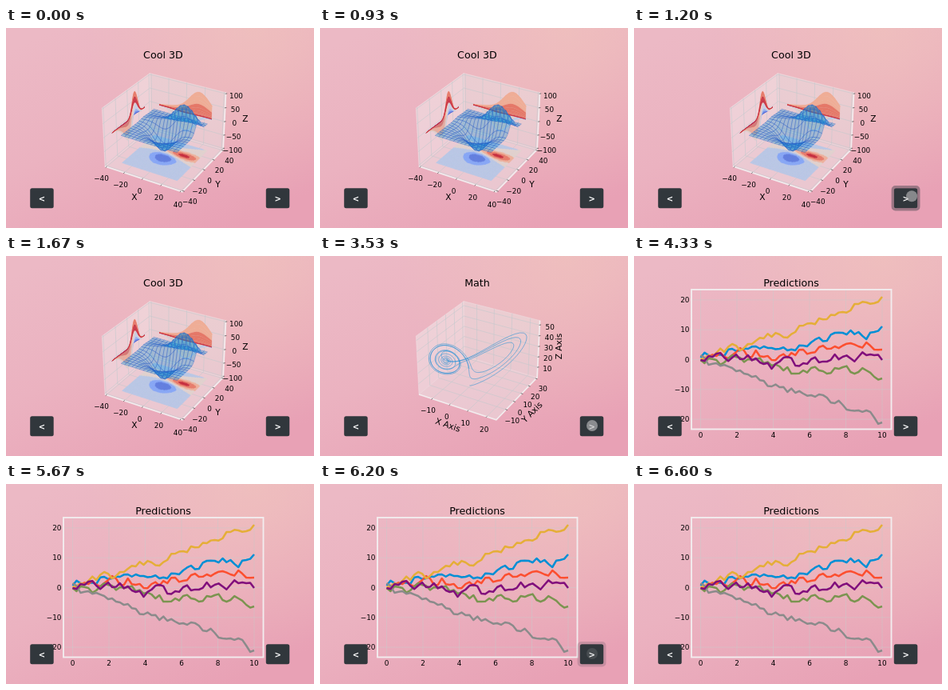
Write an HTML page with a canvas that moves like this. It is 386 px wide and 250 px high and loops after 8 s.

```html
<!DOCTYPE html>
<html lang="en">
<head>
<meta charset="utf-8">
<title>Plot carousel</title>
<style>
html, body { margin: 0; width: 100%; height: 100%; overflow: hidden; background: #eab0be; }
canvas { display: block; width: 386px; height: 250px; }
</style>
</head>
<body>
<canvas id="stage"></canvas>
<script>
const W = 386, H = 250, LOOP = 8000;
const ratio = window.devicePixelRatio || 1;
const FONT = '"DejaVu Sans", sans-serif';
const AXIS = '#f2ecee', GRID = 'rgba(203,203,203,.75)', GRID3D = 'rgba(194,200,204,.85)';
const TITLE = 12.7, TICK = 8.9, LABEL = 10.6;

function prepare(canvas) {
  canvas.width = W * ratio;
  canvas.height = H * ratio;
  const c = canvas.getContext('2d');
  c.scale(ratio, ratio);
  return c;
}

function text(c, s, x, y, size, align = 'center', angle = 0, color = '#000', weight = '') {
  c.save();
  c.translate(x, y);
  c.rotate(angle * Math.PI / 180);
  c.font = `${weight} ${size}px ${FONT}`;
  c.textAlign = align;
  c.textBaseline = 'alphabetic';
  c.fillStyle = color;
  c.fillText(s, 0, size * 0.365);
  c.restore();
}

function path(c, pts, close) {
  c.beginPath();
  pts.forEach(p => c.lineTo(p[0], p[1]));
  if (close) c.closePath();
}

function line(c, pts, color, width) {
  path(c, pts);
  c.strokeStyle = color;
  c.lineWidth = width;
  c.stroke();
}

function fill(c, pts, color, edge, width) {
  path(c, pts, true);
  c.fillStyle = color;
  c.fill();
  if (edge) {
    c.strokeStyle = edge;
    c.lineWidth = width;
    c.stroke();
  }
}

function background(c) {
  const base = c.createLinearGradient(110, -20, 240, 270);
  base.addColorStop(0, '#ecb9c5');
  base.addColorStop(0.45, '#ebb2c0');
  base.addColorStop(1, '#e8a1b5');
  c.fillStyle = base;
  c.fillRect(0, 0, W, H);
  const glow = c.createRadialGradient(310, 0, 0, 310, 0, 210);
  glow.addColorStop(0, 'rgba(242,200,186,.5)');
  glow.addColorStop(1, 'rgba(242,200,186,0)');
  c.fillStyle = glow;
  c.fillRect(0, 0, W, H);
}

// Perspective view at elevation 30, azimuth -60; each axis runs from -1 to 1.
function project(a, b, h) {
  const x = a * 0.595, y = b * 0.595, z = h * 0.4464;
  const depth = 10 - (0.433 * x - 0.75 * y + 0.5 * z);
  return [
    199.5 + 895 * (0.866 * x + 0.5 * y) / depth,
    127 - 895 * (-0.25 * x + 0.433 * y + 0.866 * z) / depth
  ];
}

const label = v => String(v).replace('-', '\u2212');
const scaler = (lo, hi) => v => 2 * (v - lo) / (hi - lo) - 1;

function axes3d(c, xt, yt, zt) {
  const e = 1 + 1 / 24, thin = 'rgba(242,236,238,.6)';
  const run = pts => pts.map(p => project(...p));
  fill(c, run([[-e, -e, -e], [-e, e, -e], [-e, e, e], [-e, -e, e]]), 'rgba(242,242,242,.45)');
  fill(c, run([[-e, e, -e], [e, e, -e], [e, e, e], [-e, e, e]]), 'rgba(230,230,230,.45)');
  fill(c, run([[-e, -e, -e], [e, -e, -e], [e, e, -e], [-e, e, -e]]), 'rgba(236,236,236,.45)');
  line(c, run([[-e, -e, -e], [-e, -e, e], [-e, e, e], [e, e, e]]), thin, 0.6);
  line(c, run([[-e, e, e], [-e, e, -e]]), thin, 0.6);
  line(c, run([[-e, -e, -e], [-e, e, -e], [e, e, -e]]), thin, 0.6);
  xt.forEach(v => line(c, run([[v, -e, -e], [v, e, -e], [v, e, e]]), GRID3D, 0.65));
  yt.forEach(v => line(c, run([[e, v, -e], [-e, v, -e], [-e, v, e]]), GRID3D, 0.65));
  zt.forEach(v => line(c, run([[-e, -e, v], [-e, e, v], [e, e, v]]), GRID3D, 0.65));
  line(c, run([[-e, -e, -e], [e, -e, -e], [e, e, -e], [e, e, e]]), AXIS, 1.7);
  const tick = (p, q) => line(c, run([p, q]), '#222', 0.6);
  xt.forEach(v => tick([v, -e - 0.035, -e], [v, -e + 0.02, -e]));
  yt.forEach(v => tick([e + 0.035, v, -e], [e - 0.02, v, -e]));
  zt.forEach(v => tick([e + 0.025, e + 0.025, v], [e - 0.01, e - 0.01, v]));
}

// Tick labels sit on straight rows between the two ends of an axis.
function ticks3d(c, values, at, x0, y0, x1, y1) {
  values.forEach(v => {
    const k = (at(v) + 1) / 2;
    text(c, label(v), x0 + (x1 - x0) * k, y0 + (y1 - y0) * k, TICK);
  });
}

function plot3d(c, title, x, y, z) {
  text(c, title, 197, 33.3, TITLE);
  axes3d(c, x.ticks.map(x.at), y.ticks.map(y.at), z.ticks.map(z.at));
  ticks3d(c, x.ticks, x.at, 119.5, 187.3, 215.5, 220.3);
  ticks3d(c, y.ticks, y.at, 230.3, 216.5, 279.8, 165.5);
  ticks3d(c, z.ticks, z.at, 284, 153, 288.5, 84.5);
}

const STOPS = [[59, 76, 192], [124, 160, 249], [221, 221, 221], [245, 156, 125], [180, 4, 38]];

function coolwarm(v) {
  const s = Math.max(0, Math.min(1, v)) * 4;
  const i = Math.min(3, Math.floor(s));
  const mix = STOPS[i].map((a, k) => Math.round(a + (STOPS[i + 1][k] - a) * (s - i)));
  return `rgb(${mix})`;
}

function hill(x, y) {
  const a = x / 10, b = y / 10;
  const wide = Math.exp(-(a * a + b * b) / 2) / (2 * Math.PI);
  const narrow = Math.exp(-(((a - 1) / 1.5) ** 2 + ((b - 1) / 0.5) ** 2) / 2) / (1.5 * Math.PI);
  return 500 * (narrow - wide);
}

function floorMap(c) {
  const step = 0.75;
  for (let x = -30; x < 29.5; x += step) {
    for (let y = -30; y < 29.5; y += step) {
      const band = Math.floor(hill(x + step / 2, y + step / 2) / 25) * 25 + 12.5;
      const color = coolwarm((band + 90) / 190);
      const at = (a, b) => project(a / 40, b / 40, -1);
      fill(c, [at(x, y), at(x + step, y), at(x + step, y + step), at(x, y + step)], color, color, 0.3);
    }
  }
}

// Each band is swept between neighbouring slices of the surface.
function wallBands(c, height, place) {
  for (let k = 0; k < 8; k++) {
    const lo = Math.max(-30, -32 + 8 * k), hi = Math.min(29.5, -24 + 8 * k);
    const color = coolwarm(0.06 + k / 8);
    for (let j = 0; j < 6; j++) {
      const s = lo + (hi - lo) * j / 6, e = lo + (hi - lo) * (j + 1) / 6;
      const there = [], back = [];
      for (let u = -30; u <= 29.5; u += 0.85) {
        there.push(place(u, height(s, u)));
        back.unshift(place(u, height(e, u)));
      }
      fill(c, there.concat(back), color, color, 0.15);
    }
  }
}

function surface(c) {
  const at = (x, y) => project(x / 40, y / 40, hill(x, y) / 100);
  for (let y = 26; y >= -30; y -= 4) {
    for (let x = -30; x <= 26; x += 4) {
      const x2 = Math.min(29.5, x + 4), y2 = Math.min(29.5, y + 4);
      const pts = [];
      const side = (xa, ya, xb, yb) => {
        for (let i = 0; i < 4; i++) pts.push(at(xa + (xb - xa) * i / 4, ya + (yb - ya) * i / 4));
      };
      side(x, y, x2, y);
      side(x2, y, x2, y2);
      side(x2, y2, x, y2);
      side(x, y2, x, y);
      fill(c, pts, 'rgba(0,143,213,.3)', 'rgba(50,98,200,.72)', 0.45);
    }
  }
}

function drawHill(c) {
  const flat = { at: scaler(-40, 40), ticks: [-40, -20, 0, 20, 40] };
  const tall = { at: scaler(-100, 100), ticks: [-100, -50, 0, 50, 100] };
  plot3d(c, 'Cool 3D', flat, flat, tall);
  text(c, 'X', 161, 211, LABEL);
  text(c, 'Y', 265.5, 195, LABEL);
  text(c, 'Z', 300, 113, LABEL);
  floorMap(c);
  wallBands(c, (s, u) => hill(s, u), (u, h) => project(-1, u / 40, h / 100));
  wallBands(c, (s, u) => hill(u, s), (u, h) => project(u / 40, 1, h / 100));
  surface(c);
}

function drawLorenz(c) {
  const ax = { at: scaler(-16.8, 24.2), ticks: [-10, 0, 10, 20] };
  const ay = { at: scaler(-21, 30.5), ticks: [-10, 0, 10, 20, 30] };
  const az = { at: scaler(1, 53), ticks: [10, 20, 30, 40, 50] };
  plot3d(c, 'Math', ax, ay, az);
  text(c, 'X Axis', 160.3, 211, LABEL, 'center', 19);
  text(c, 'Y Axis', 265.5, 195, LABEL, 'center', -45);
  text(c, 'Z Axis', 299.6, 113, LABEL, 'center', -90);

  // Three swings to the right wing, each followed by turns around the left one.
  let x = 0, y = 1, z = 1.05, swings = 0;
  const dt = 0.01, pts = [];
  for (let i = 0; i < 1500 && swings < 4; i++) {
    pts.push(project(ax.at(x), ay.at(y), az.at(z)));
    const nx = x + 10 * (y - x) * dt;
    const ny = y + (28 * x - y - x * z) * dt;
    z += (x * y - 2.667 * z) * dt;
    if (x <= 0 && nx > 0) swings++;
    x = nx;
    y = ny;
  }
  c.lineJoin = 'round';
  line(c, pts, 'rgba(20,138,213,.85)', 0.6);
}

function random(seed) {
  return () => {
    seed = (seed * 16807) % 2147483647;
    return seed / 2147483647;
  };
}

const noise = random(4217);

function walk(c, color, knots) {
  const step = 227.5 / (knots.length - 1), pts = [];
  knots.forEach((y, i) => {
    const x = 83.5 + i * step;
    pts.push([x, y]);
    if (i < knots.length - 1) {
      pts.push([x + step / 2, (y + knots[i + 1]) / 2 + (noise() - 0.5) * 10]);
    }
  });
  line(c, pts, color, 2.5);
}

function drawWalks(c) {
  text(c, 'Predictions', 197, 33.3, TITLE);
  for (let v = 0; v <= 10; v += 2) {
    const x = 83.5 + v * 22.75;
    line(c, [[x, 42], [x, 216]], GRID, 0.63);
    text(c, v, x, 224, TICK);
  }
  for (let v = -20; v <= 20; v += 10) {
    const y = 129.5 - v * 3.73;
    line(c, [[72, y], [322, y]], GRID, 0.63);
    text(c, label(v), 69.5, y, TICK, 'right');
  }
  c.lineJoin = 'round';
  walk(c, '#008fd5', [127, 124, 124, 125, 116, 118, 116, 113, 113, 115, 116, 118, 118, 112, 108, 102, 106, 96, 96, 93, 95, 104, 95, 88]);
  walk(c, '#fc4f30', [131, 126, 125, 126, 124, 115, 126, 118, 126, 130, 125, 127, 124, 117, 121, 114, 116, 113, 112, 109, 113, 108, 117, 117]);
  walk(c, '#e5ae38', [129, 124, 121, 120, 110, 118, 110, 106, 103, 101, 98, 102, 95, 87, 84, 78, 79, 74, 70, 68, 60, 58, 59, 51]);
  walk(c, '#7b9450', [130, 128, 130, 133, 124, 127, 129, 129, 134, 137, 138, 139, 147, 143, 140, 143, 147, 140, 139, 145, 145, 143, 151, 153]);
  walk(c, '#8b8b8b', [124, 136, 134, 136, 140, 143, 148, 150, 156, 163, 164, 170, 171, 172, 174, 173, 177, 184, 186, 193, 193, 193, 202, 208]);
  walk(c, '#810f7c', [130, 125, 122, 127, 127, 129, 124, 128, 135, 141, 132, 126, 137, 134, 129, 133, 132, 123, 126, 128, 126, 124, 124, 130]);
  c.lineJoin = 'miter';
  c.strokeStyle = AXIS;
  c.lineWidth = 1.9;
  c.strokeRect(72, 42, 250.5, 174.5);
}

function button(c, x, sign) {
  c.beginPath();
  c.roundRect(x, 200.2, 29.5, 25, 2.5);
  c.fillStyle = '#31373c';
  c.fill();
  text(c, sign, x + 14.8, 213, 10, 'center', 0, '#fff', 'bold');
}

function scene(draw) {
  const canvas = document.createElement('canvas');
  const c = prepare(canvas);
  background(c);
  draw(c);
  button(c, 30.2, '<');
  button(c, 325.8, '>');
  return canvas;
}

const ctx = prepare(document.getElementById('stage'));
const hillScene = scene(drawHill);
const lorenzScene = scene(drawLorenz);
const walkScene = scene(drawWalks);

// Each press flashes a ring that dies away; drift is the pointer's speed in px per ms.
const presses = [
  { start: 1070, end: 1670, drift: 0.054 },
  { start: 3530, end: 4330, drift: 0 },
  { start: 5870, end: 6600, drift: 0 }
];

const clamp = v => Math.max(0, Math.min(1, v));

function press(c, p, t) {
  if (t < p.start || t >= p.end) return;
  const age = t - p.start;
  const rise = clamp((age - 40) / 90);
  const fade = clamp((p.end - t) / (p.end - p.start - 130));
  c.beginPath();
  c.roundRect(322.6, 197, 35.9, 31.4, 5);
  c.roundRect(325.8, 200.2, 29.5, 25, 2.5);
  c.fillStyle = `rgba(52,58,64,${0.42 * rise * fade * fade})`;
  c.fill('evenodd');

  const dot = 0.65 * clamp((400 - age) / 280);
  c.beginPath();
  c.arc(341 + p.drift * age, 212 - p.drift * age * 0.25, 7, 0, 2 * Math.PI);
  c.fillStyle = `rgba(186,186,188,${dot})`;
  c.fill();
}

const begin = performance.now();

function frame() {
  const t = (performance.now() - begin) % LOOP;
  const view = t < 3530 ? hillScene : t < 4330 ? lorenzScene : walkScene;
  ctx.drawImage(view, 0, 0, W, H);
  presses.forEach(p => press(ctx, p, t));
  requestAnimationFrame(frame);
}
frame();
</script>
</body>
</html>
```
